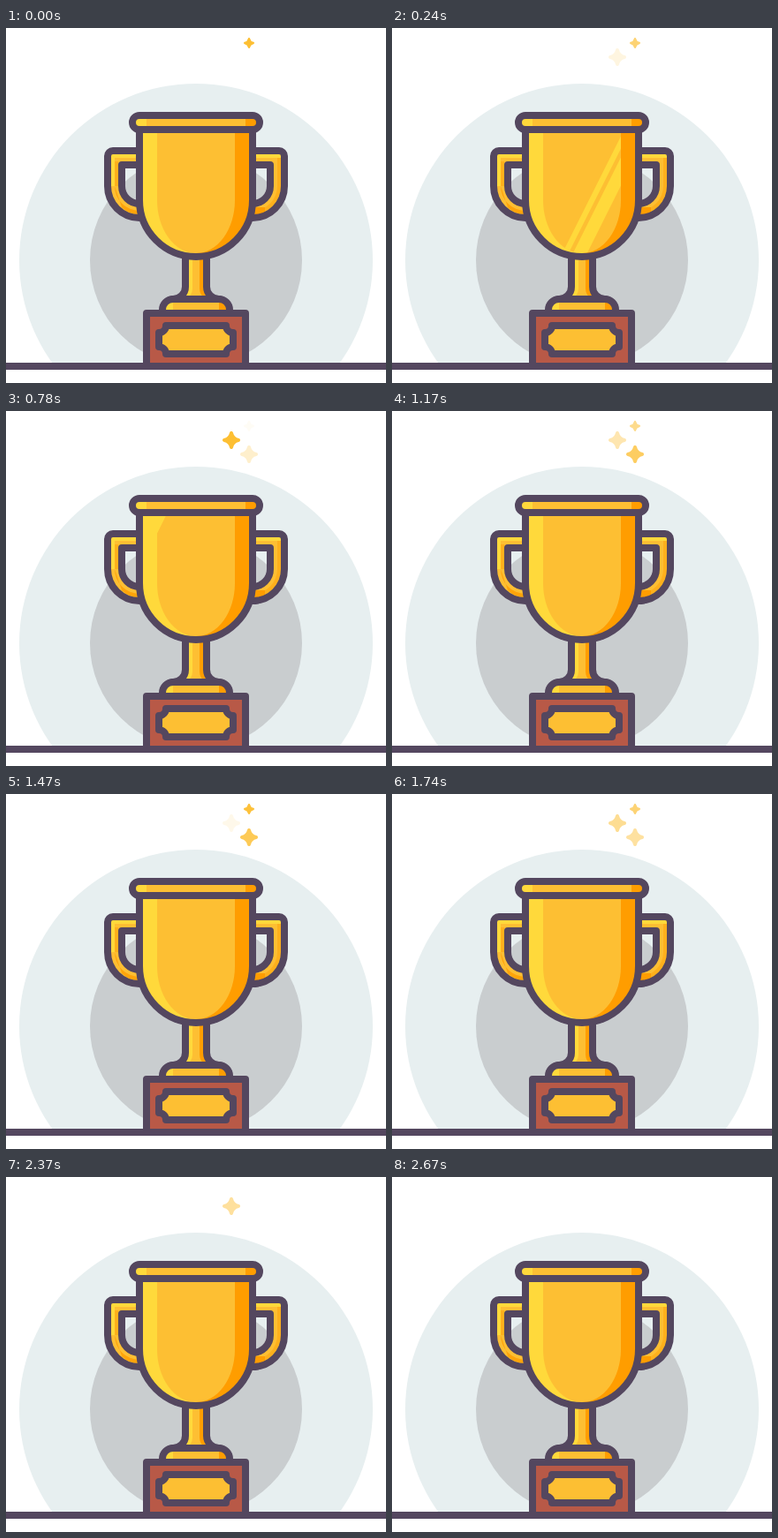
An HTML page that plays this animation: 430x402 px, repeating every 2.7 s.

```html
<!DOCTYPE html>
<html lang="en">
<head>
<meta charset="utf-8">
<title>Trophy</title>
<style>
  html, body { margin: 0; width: 100%; height: 100%; overflow: hidden; background: #fff; }
  svg { display: block; width: 430px; height: 402px; }
  .line { stroke: #54475f; stroke-width: 8; stroke-linejoin: round; stroke-linecap: round; fill: none; }
  .gold { fill: #fdbf33; }
  .light { fill: #ffd93b; }
  .dark { fill: #ff9d00; }
  .star { fill: #fdbf33; stroke: #fdbf33; stroke-width: 4; stroke-linejoin: round; }
</style>
</head>
<body>
<svg viewBox="0 0 430 402">
  <defs>
    <clipPath id="sky"><path d="M0 0H430V380H0z"/></clipPath>
    <clipPath id="bowl"><path d="M151 115V195a64 64 0 0 0 128 0V115z"/></clipPath>
    <path id="spark" d="M0-8Q1.5-1.5 8 0Q1.5 1.5 0 8Q-1.5 1.5-8 0Q-1.5-1.5 0-8z"/>
    <g id="handle">
      <path class="gold" d="M151 139H121a6 6 0 0 0-6 6V179a36 36 0 0 0 36 36V199a20 20 0 0 1-20-20V155H151z"/>
    </g>
    <g id="handleLine" class="line">
      <path d="M151 139H121a6 6 0 0 0-6 6V179a36 36 0 0 0 36 36"/>
      <path d="M151 155H131V179a20 20 0 0 0 20 20"/>
    </g>
  </defs>

  <g clip-path="url(#sky)">
    <circle cx="215" cy="263" r="200" fill="#e7eff0"/>
    <circle cx="215" cy="263" r="120" fill="#c9cdcf"/>
  </g>

  <!-- handles -->
  <use href="#handle"/>
  <path class="light" d="M119 143H151V147H123V179H119z"/>
  <path class="dark" d="M123 179a28 28 0 0 0 28 28V211a28 28 0 0 1-20-8z" opacity=".8"/>
  <path class="dark" d="M123 151H127V179H123z" opacity=".45"/>
  <use href="#handleLine"/>
  <use href="#handle" transform="matrix(-1 0 0 1 430 0)"/>
  <path class="light" d="M279 143H311V147H279z"/>
  <path class="dark" d="M307 179a28 28 0 0 1-28 28V211a32 32 0 0 0 32-32V147H307z" opacity=".45"/>
  <path class="dark" d="M279 203h14v8h-14z"/>
  <use href="#handleLine" transform="matrix(-1 0 0 1 430 0)"/>

  <!-- stem and foot -->
  <path class="gold" d="M203 259V293a14 14 0 0 1-14 14a12 12 0 0 0-12 12H253a12 12 0 0 0-12-12a14 14 0 0 1-14-14V259z"/>
  <path class="light" d="M207 259h4v36q0 8-8 12h-6q10-4 10-14zM181 311h8v8h-8z"/>
  <path class="dark" d="M223 259h-4v36q0 8 8 12h6q-10-4-10-14zM241 311h8v8h-8z"/>
  <path class="line" d="M203 259V293a14 14 0 0 1-14 14M227 259V293a14 14 0 0 0 14 14"/>
  <path class="line" d="M177 319a12 12 0 0 1 12-12H241a12 12 0 0 1 12 12"/>

  <!-- bowl -->
  <g clip-path="url(#bowl)">
    <path class="gold" d="M151 115H279V259H151z"/>
    <path id="shine" class="light" d="M0 119h7l-70 140h-7zM12 119h16l-70 140h-16z"/>
    <path class="light" d="M151 115H171V195a44 60 0 0 0 44 60V259H151z"/>
    <path class="dark" d="M279 115H259V195a44 60 0 0 1-44 60V259H279z"/>
  </g>
  <path class="line" d="M151 115V195a64 64 0 0 0 128 0V115z"/>
  <rect class="gold" x="143" y="99" width="144" height="16" rx="8"/>
  <path class="light" d="M147 102h12v10h-12z"/>
  <path class="dark" d="M271 102h12v10h-12z"/>
  <rect class="line" x="143" y="99" width="144" height="16" rx="8"/>

  <!-- plinth and ground -->
  <path class="line" style="fill:#b85947" d="M159 323H271V383H159z"/>
  <path class="line" style="fill:#fdbf33" d="M181 337H249a8 8 0 0 0 8 8V361a8 8 0 0 0-8 8H181a8 8 0 0 0-8-8V345a8 8 0 0 0 8-8z"/>
  <path fill="#54475f" d="M0 379H430V387H0z"/>

  <use class="star" href="#spark" transform="translate(275 17) scale(.6)"/>
  <use class="star" href="#spark" transform="translate(255 33)"/>
  <use class="star" href="#spark" transform="translate(275 49)"/>
</svg>
<script>
  const LOOP = 2700;
  const shine = document.getElementById('shine');
  const stars = document.querySelectorAll('.star');
  // Each star fades up and down; times in ms.
  const fades = [
    { start: -750, half: 750, end: 2250 },
    { start: 150, half: 630, end: 2670 },
    { start: 600, half: 740, end: 2080 },
  ];

  function glow(t, { start, half, end }) {
    if (t < start || t > end) return 0;
    return 1 - Math.abs(1 - ((t - start) / half) % 2);
  }

  function draw(now) {
    const t = now % LOOP;
    shine.setAttribute('transform', `translate(${309 - 0.2 * t} 0)`);
    stars.forEach((star, i) => star.setAttribute('opacity', glow(t, fades[i])));
    requestAnimationFrame(draw);
  }
  draw(0);
</script>
</body>
</html>
```
